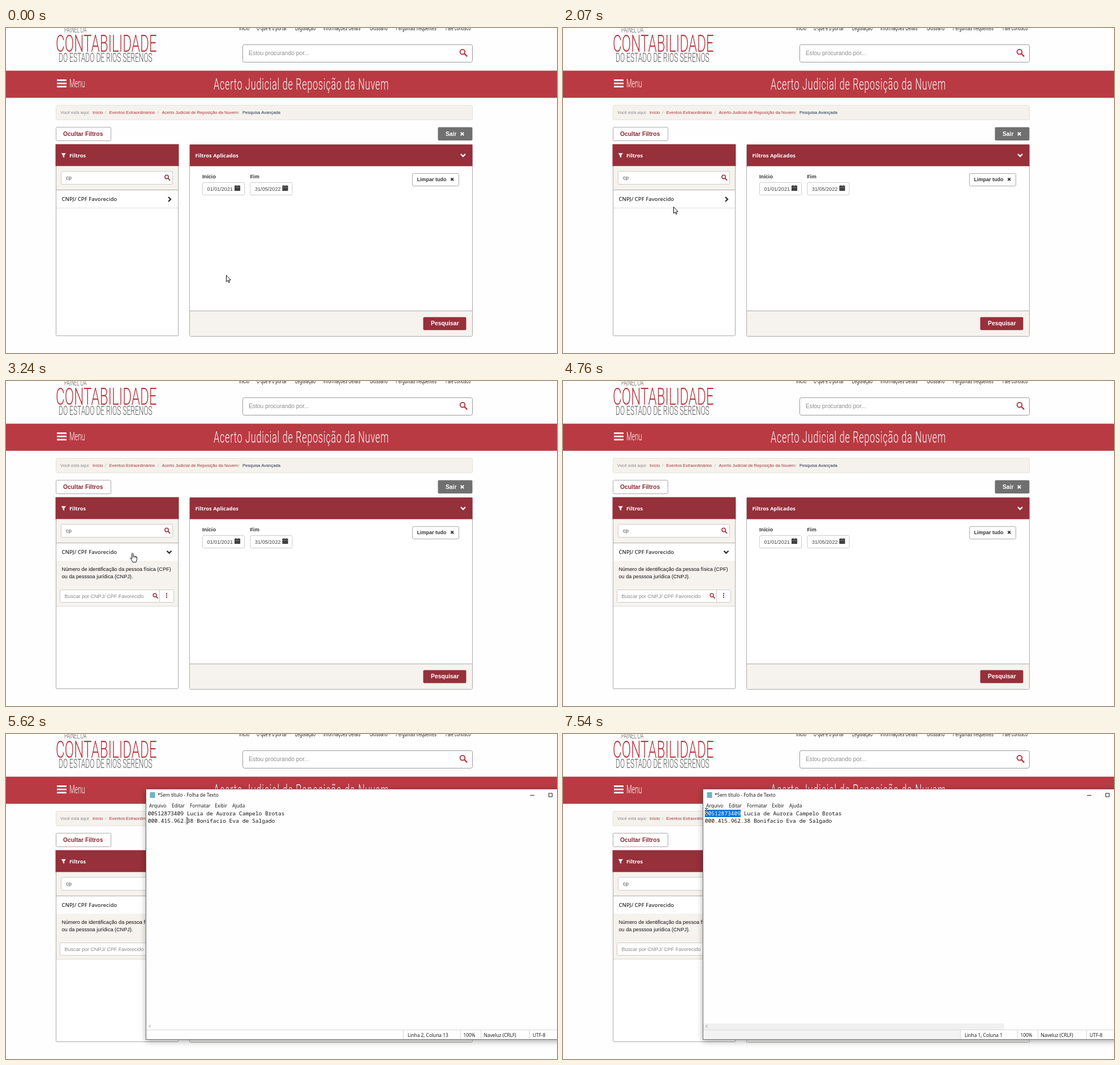
Write an HTML page with a canvas that moves like this. It is 974x575 px and loops after 8 s.

```html
<!DOCTYPE html>
<html lang="pt-BR">
<head>
<meta charset="utf-8">
<title>Pesquisa Avançada</title>
<style>
  html, body { margin: 0; width: 100%; height: 100%; overflow: hidden; background: #fefefe; }
  canvas { display: block; }
</style>
</head>
<body>
<canvas id="stage" width="974" height="575"></canvas>
<script>
const ctx = document.getElementById('stage').getContext('2d');
const LOOP = 8000;
const WINE = '#96303b', RED = '#b93a42', BEIGE = '#f6f3ee', INK = '#333', LINE = '#aaa';
const SANS = '"Liberation Sans", Arial, sans-serif';
const UI = '"Open Sans", "Noto Sans", sans-serif';
const MONO = '"Noto Sans Mono", "DejaVu Sans Mono", monospace';
const THIN = 'Roboto, sans-serif';
const NARROW = 0.57; // one fixed proportion for the condensed display face
const AGREEMENT = 'Acerto Judicial de Reposição da Nuvem';

// [time, pointer kind, x, y]
const POINTER = [
  [0, 'arrow', 389, 437], [1490, 'arrow', 352, 372], [1620, 'arrow', 313, 313],
  [1770, 'arrow', 105, 425], [1920, 'arrow', 178, 362], [2070, 'arrow', 195, 316],
  [2220, 'hand', 207, 309], [2350, 'hand', 218, 307], [2500, 'hand', 219, 304],
  [4610, 'beam', 223, 328], [4760, 'none', 0, 0],
  [5750, 'arrow', 203, 200], [5880, 'arrow', 294, 89], [6020, 'arrow', 297, 103],
  [6170, 'beam', 302, 163], [6320, 'beam', 304, 157], [6450, 'beam', 307, 150],
  [6570, 'beam', 309, 143], [6700, 'beam', 311, 136], [6850, 'beam', 312, 132],
  [7270, 'beam', 284, 131], [7390, 'beam', 256, 131], [7540, 'beam', 251, 131]
];
// [time, bottom edge of the unfolding filter]
const UNFOLD = [[0, 318], [2960, 345], [3090, 390], [3240, 399]];
// [time, first selected column]
const SELECT = [[0, 11], [7270, 6], [7390, 1], [7540, 0]];

const at = (steps, t) => steps.filter(s => s[0] <= t).pop();

function text(str, x, y, size, color = INK, font = SANS, weight = 400) {
  ctx.font = `${weight} ${size}px ${font}`;
  ctx.fillStyle = color;
  ctx.fillText(str, x, y);
}

function narrow(str, x, y, size, color, weight = 300) {
  ctx.save();
  ctx.translate(x, y);
  ctx.scale(NARROW, 1);
  text(str, 0, 0, size, color, THIN, weight);
  ctx.restore();
}

function rect(x, y, w, h, color) {
  ctx.fillStyle = color;
  ctx.fillRect(x, y, w, h);
}

function box(x, y, w, h, fill, stroke, r = 2) {
  ctx.beginPath();
  ctx.roundRect(x + .5, y + .5, w - 1, h - 1, r);
  ctx.fillStyle = fill;
  ctx.fill();
  if (stroke) {
    ctx.strokeStyle = stroke;
    ctx.lineWidth = 1;
    ctx.stroke();
  }
}

function path(points, close) {
  ctx.beginPath();
  points.forEach(([x, y]) => ctx.lineTo(x, y));
  if (close) ctx.closePath();
}

function line(points, color, width = 1) {
  path(points);
  ctx.strokeStyle = color;
  ctx.lineWidth = width;
  ctx.stroke();
}

function lens(x, y, r, color, width) {
  ctx.beginPath();
  ctx.arc(x, y, r, 0, Math.PI * 2);
  ctx.strokeStyle = color;
  ctx.lineWidth = width;
  ctx.stroke();
  const d = r * .75;
  line([[x + d, y + d], [x + r * 1.9, y + r * 1.9]], color, width * 1.25);
}

function cross(x, y, r, color, width) {
  line([[x - r, y - r], [x + r, y + r]], color, width);
  line([[x + r, y - r], [x - r, y + r]], color, width);
}

const chevronDown = (x, y, color) => line([[x - 4, y - 2], [x, y + 2], [x + 4, y - 2]], color, 2.4);

function calendar(x, y) {
  rect(x, y + 1, 10, 9, '#333');
  rect(x + 2, y, 1, 2, '#333');
  rect(x + 7, y, 1, 2, '#333');
  rect(x + 1, y + 3, 8, .6, '#ccc');
  rect(x + 1, y + 5.5, 8, .4, '#888');
  rect(x + 1, y + 7.5, 8, .4, '#888');
}

function dateField(label, value, x) {
  text(label, x, 266, 9.2, INK, SANS, 700);
  box(x, 273, 75, 23, '#fff', '#ccc');
  text(value, x + 8.5, 287.5, 9.1, '#444');
  calendar(x + 57, 278);
}

function pageTitle() {
  ctx.save();
  ctx.letterSpacing = '1.3px';
  narrow(AGREEMENT, 367, 108.5, 28.5, '#fff');
  ctx.restore();
}

function header() {
  narrow('PAINEL DA', 103, 8, 14.5, '#555');
  narrow('CONTABILIDADE', 88, 42, 42.5, RED);
  narrow('DO ESTADO DE RIOS SERENOS', 93, 60, 21.2, '#555');
  [['Início', 412], ['O que é o portal', 443], ['Legislação', 511], ['Informações Gerais', 561],
   ['Glossário', 643], ['Perguntas frequentes', 689], ['Fale conosco', 777]]
    .forEach(([label, x]) => narrow(label, x, 4, 13.2, '#333', 400));

  box(418, 29, 407, 32, '#fff', '#999', 3);
  text('Estou procurando por...', 429, 48, 10.25, '#8c8c8c');
  lens(807, 42.2, 4.3, RED, 2);

  rect(0, 75.5, 974, 48, RED);
  for (const y of [91, 96.7, 102.4]) rect(90, y, 17, 2.7, '#fff');
  narrow('Menu', 112, 104.5, 19.5, '#fff');
  pageTitle();

  box(88, 136, 737, 27, '#f5f2ed', '#e6e2db');
  [['Você está aqui:', 96, '#888'], ['Início', 153, '#a8323c'], ['/', 175, '#aaa'],
   ['Eventos Extraordinários', 182.5, '#a8323c'], ['/', 268, '#aaa'],
   [AGREEMENT, 275.5, '#a8323c'], ['/', 410.5, '#aaa'], ['Pesquisa Avançada', 418, '#1f2a4d']]
    .forEach(([label, x, color]) => text(label, x, 151.5, 7.6, color));

  box(88, 175, 98, 25, '#fff', LINE);
  text('Ocultar Filtros', 101, 190.5, 10.3, '#8a2733', SANS, 700);
  box(763, 175, 62, 24.5, '#707070');
  text('Sair', 777, 190.5, 10.3, '#fff', SANS, 700);
  cross(806.5, 187.3, 2.7, '#fff', 2);
}

function filterDetails(bottom) {
  ctx.save();
  ctx.beginPath();
  ctx.rect(88, 318, 217, bottom - 318);
  ctx.clip();
  rect(89, 318, 215, 81, BEIGE);
  text('Número de identificação da pessoa física (CPF)', 98.5, 336, 9.1, '#111');
  text('ou da pesssoa jurídica (CNPJ).', 98.5, 349, 9.1, '#111');
  box(95, 369, 202, 23, '#fff', '#ccc');
  rect(271, 370, 1, 21, '#ccc');
  text('Buscar por CNPJ/ CPF Favorecido', 103.5, 384, 9.03, '#888');
  lens(263, 379, 3, WINE, 1.4);
  for (const y of [375, 378.3, 381.6]) rect(283, y, 2, 2, WINE);
  ctx.restore();
  rect(89, bottom - 1, 215, 1, '#ddd');
}

function filterPanel(t) {
  const bottom = at(UNFOLD, t)[1];
  const open = bottom > 318;
  box(88, 206, 217, 339, '#fff', LINE, 1);
  rect(87.5, 205.5, 218, 39, WINE);
  path([[97.5, 221.5], [106, 221.5], [103, 225.2], [103, 229.5], [100.5, 228], [100.5, 225.2]], true);
  ctx.fillStyle = '#fff';
  ctx.fill();
  text('Filtros', 112, 228.5, 9.3, '#fff', UI, 700);
  rect(89, 244.5, 215, 41.5, BEIGE);
  box(97, 253, 198, 24, '#fff', '#ccc');
  text('cp', 106, 268, 9.3, '#444');
  lens(284, 263.5, 3.2, WINE, 1.5);
  rect(88, 286, 217, 1, LINE);
  text('CNPJ/ CPF Favorecido', 98.5, 306, 9.5, INK, UI, 600);
  if (open) {
    chevronDown(288.5, 302.5, INK);
    filterDetails(bottom);
  } else {
    line([[287, 299], [291, 303], [287, 307]], INK, 2.4);
    rect(89, 318, 215, 1, '#ddd');
  }
}

function appliedPanel() {
  box(324, 206, 501, 340, '#fff', LINE, 2);
  rect(325, 206, 499.5, 38.5, WINE);
  text('Filtros Aplicados', 334.5, 228.5, 9.3, '#fff', UI, 700);
  chevronDown(808, 225, '#fff');
  dateField('Início', '01/01/2021', 347);
  dateField('Fim', '31/05/2022', 431.5);
  box(718, 257, 83, 23, '#fff', LINE);
  text('Limpar tudo', 726.5, 270.5, 9, INK, SANS, 700);
  cross(788.7, 267.7, 2.3, INK, 1.8);
  rect(325, 500, 499, 45, BEIGE);
  rect(325, 500, 499, 1, LINE);
  box(737, 511, 77, 24, WINE);
  text('Pesquisar', 751, 526, 10.4, '#fff', SANS, 700);
}

// The shadow stays outside the frame, so a translucent window is not darkened.
function windowFrame() {
  const frame = [247, 97, 767, 444];
  ctx.save();
  ctx.beginPath();
  ctx.rect(200, 50, 860, 540);
  ctx.rect(...frame);
  ctx.clip('evenodd');
  ctx.shadowColor = 'rgba(0,0,0,.32)';
  ctx.shadowBlur = 10;
  ctx.shadowOffsetY = 3;
  rect(...frame, '#fff');
  ctx.restore();
  rect(...frame, '#fefefe');
  ctx.strokeStyle = '#707070';
  ctx.lineWidth = 1;
  ctx.strokeRect(247.5, 97.5, 766, 443);
}

function notepad(t) {
  const entering = t < 5620;
  const selecting = t >= 7270;
  const column = at(SELECT, t)[1];
  const number = '00512873409';
  ctx.save();
  if (entering) {
    ctx.transform(.947, 0, 0, .947, 16.7, 41.1);
    ctx.globalAlpha = .76;
  }
  windowFrame();

  rect(254.5, 103, 9, 10, '#6fb0c4');
  text('*Sem título - Folha de Texto', 268, 111.3, 8.4, '#111', UI);
  line([[926.5, 108.5], [934, 108.5]], '#222');
  ctx.strokeRect(959.5, 105, 6, 6);
  cross(996, 108, 3.3, '#222', 1);
  [['Arquivo', 253], ['Editar', 293], ['Formatar', 325], ['Exibir', 369], ['Ajuda', 400]]
    .forEach(([label, x]) => text(label, x, 129.5, 8.4, '#111', UI));

  text(number + ' Lucia de Aurora Campelo Brotas', 250.7, 144, 9.6, '#111', MONO);
  text('000.415.962.38 Bonifacio Eva de Salgado', 250.7, 157, 9.6, '#111', MONO);
  if (column < 11) {
    const x = 250.7 + column * 5.76;
    rect(x, 134, 314 - x, 13, '#0078d7');
    text(number.slice(column), x, 144, 9.6, '#fff', MONO);
  }
  if (t < 6020 || (t >= 6570 && t < 6850)) rect(319.5, 147, 1, 13, '#000');
  if (t >= 6850 && !selecting) rect(314, 134, 1, 13, '#000');

  if (selecting) {
    rect(248, 512, 532, 11, '#f0f0f0');
    rect(248, 523, 454, 17, '#f3f3f3');
  }
  line([[255.5, 514.5], [252.5, 517], [255.5, 519.5]], '#999');
  line([[992.5, 514.5], [995.5, 517], [992.5, 519.5]], '#999');
  line([[1003, 142], [1006, 139], [1009, 142]], '#999');
  line([[1003, 505], [1006, 508], [1009, 505]], '#999');
  rect(248, 523, 765, 1, '#d9d9d9');
  for (const x of [702, 803, 839, 925]) rect(x, 524, 1, 16, '#d9d9d9');
  const position = selecting ? `Linha 1, Coluna ${column + 1}` : 'Linha 2, Coluna 13';
  [[position, 710], ['100%', 808.5], ['Naveluz (CRLF)', 844.5], ['UTF-8', 931]]
    .forEach(([label, x]) => text(label, x, 535.5, 8.4, '#111', UI));
  ctx.restore();
}

const SHAPES = {
  arrow: [[.5, .5], [.5, 12], [3.1, 9.6], [4.9, 13.6], [6.6, 12.8], [4.9, 9], [8.3, 8.8]],
  hand: [[3.5, 1.2], [4.5, .5], [5.7, 1.2], [5.9, 6], [8, 5.7], [8.5, 6.5], [10.3, 6.2], [10.8, 7.2],
    [12.3, 7.4], [12.5, 11.5], [11, 16.4], [5, 16.4], [3.4, 13.3], [.7, 9.7], [1.6, 8.6], [3.6, 10.3]]
};

function pointer([, kind, x, y]) {
  if (kind === 'none') return;
  ctx.save();
  ctx.translate(x, y);
  if (kind === 'beam') {
    // inverts whatever lies below, like a system text cursor
    ctx.globalCompositeOperation = 'difference';
    rect(0, 0, 2, 1, '#fff');
    rect(3, 0, 2, 1, '#fff');
    rect(2, 1, 1, 10, '#fff');
    rect(0, 11, 2, 1, '#fff');
    rect(3, 11, 2, 1, '#fff');
  } else {
    path(SHAPES[kind], true);
    ctx.fillStyle = '#fff';
    ctx.fill();
    ctx.strokeStyle = '#111';
    ctx.lineWidth = 1;
    ctx.stroke();
    if (kind === 'hand') {
      line([[5.9, 5.5], [5.9, 8.5]], '#111', .7);
      line([[8.4, 6.5], [8.4, 9]], '#111', .7);
      line([[10.6, 7], [10.6, 9.2]], '#111', .7);
    }
  }
  ctx.restore();
}

function draw(t) {
  rect(0, 0, 974, 575, '#fefefe');
  header();
  filterPanel(t);
  appliedPanel();
  if (t >= 5500) notepad(t);
  pointer(at(POINTER, t));
}

const start = performance.now();
function tick() {
  draw((performance.now() - start) % LOOP);
  requestAnimationFrame(tick);
}
tick();
</script>
</body>
</html>
```
